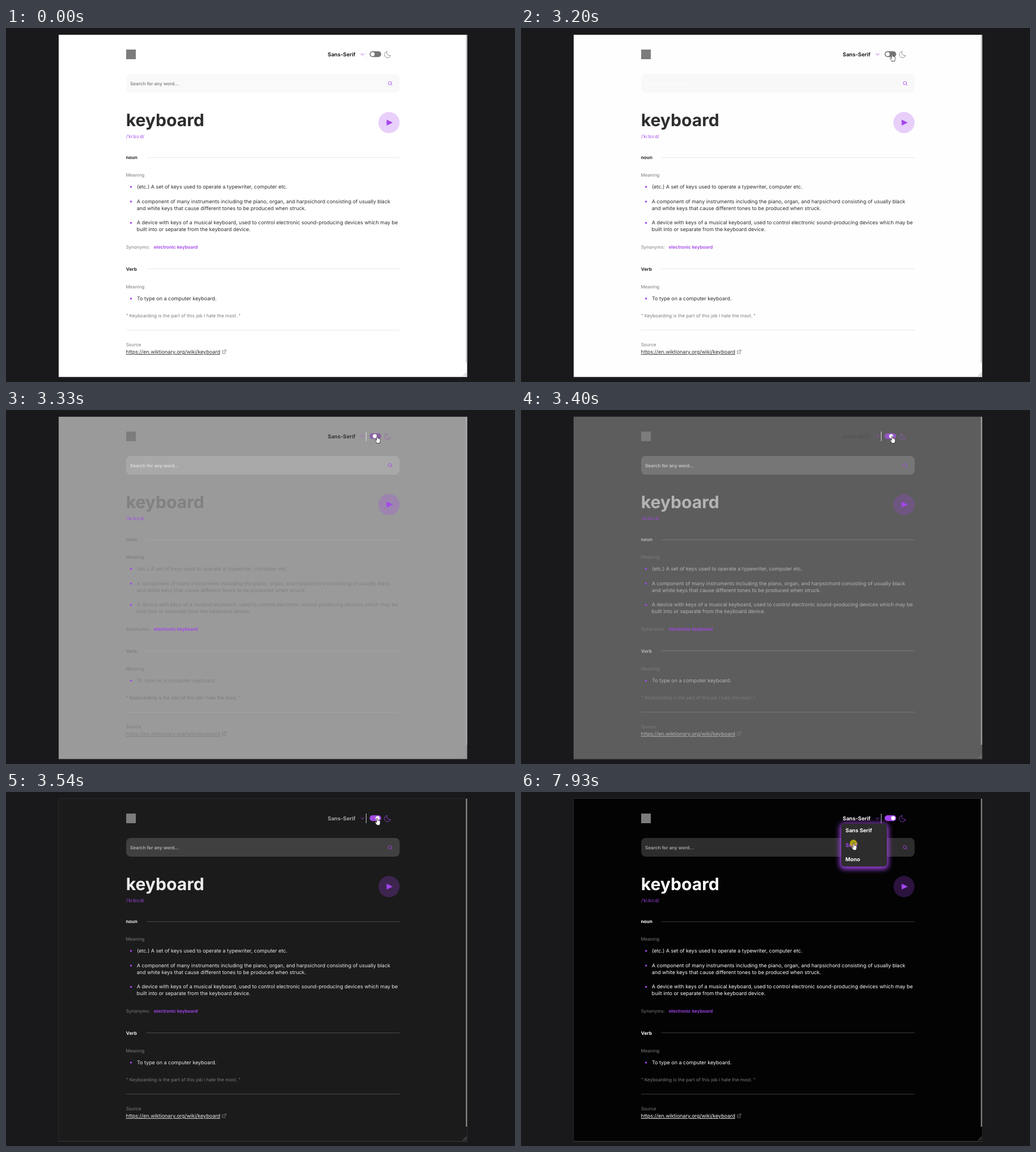
These frames come from a looping animation (898x624 px, 8 s). An HTML page:

```html
<!DOCTYPE html>
<html lang="en">
<head>
<meta charset="utf-8">
<title>Dictionary theme switch</title>
<style>
  html, body { margin: 0; width: 100%; height: 100%; overflow: hidden; background: #19191c; }
  svg { display: block; }
  text {
    font-family: Inter, "Open Sans", sans-serif;
    font-size: 8px;
    font-optical-sizing: none;
    text-rendering: geometricPrecision;
    white-space: pre;
  }
  .ink { fill: #2d2d2d; }
  .body { font-size: 8.98px; }
  .part { font-size: 8.2px; font-weight: 700; }
  .soft { fill: #7c7c7c; }
  .quote { font-size: 8.1px; }
  .semi { font-size: 8.07px; font-weight: 600; }
  .title { font-size: 30.1px; font-weight: 700; }
  .menu { font-size: 9.4px; font-weight: 700; }
  .opt { fill: #fff; }
  .accent { fill: #a445ed; }
  .link { text-decoration: underline; text-decoration-thickness: .8px; text-underline-offset: 1.6px; }
  .rule { stroke: #e9e9e9; }
  .icon { fill: none; stroke: #a445ed; stroke-width: .85; stroke-linecap: round; stroke-linejoin: round; }
  .grey { stroke: #7c7c7c; }
  .glow { fill: #a445ed; filter: blur(5px); }
</style>
</head>
<body>
<svg width="898" height="624" viewBox="0 0 898 624">
  <rect x="92.3" y="11.3" width="721.9" height="605.4" fill="#303032"/>
  <rect id="page" x="93" y="12" width="720.5" height="603" fill="#fff"/>
  <rect id="thumb" x="811.4" y="12" width="2" height="578" fill="#c6c6c6"/>
  <path d="M806.5 614L813 607.5M810 614L813 611" stroke="#8c8c8c" stroke-width=".9" fill="none"/>

  <!-- header -->
  <rect x="212" y="38" width="17" height="17" fill="#7c7c7c"/>
  <text id="font" class="ink menu" x="567.5" y="50">Sans-Serif</text>
  <path class="icon" d="M626.3 45.3L629 48L631.7 45.3"/>
  <path id="divider" d="M635.5 38V55" stroke="#efefef"/>
  <rect id="switch" x="641.5" y="41" width="20.5" height="10.2" rx="5.1" fill="#757575"/>
  <circle id="knob" cx="646.8" cy="46.1" r="3.6" fill="#fff"/>
  <path id="moon" class="icon grey" d="M671.8 41.4A5.6 5.6 0 1 0 678.5 48.5A5.6 5.6 0 0 1 671.8 41.4Z"/>

  <!-- search -->
  <rect id="search" x="212" y="81" width="482.5" height="33" rx="8" fill="#f9f9f9"/>
  <text id="hint" class="semi" x="219" y="100.6" fill="#858585">Search for any word...</text>
  <g class="icon"><circle cx="677.3" cy="97.2" r="2.9"/><path d="M679.5 99.4L681.3 101.2"/></g>

  <!-- entry -->
  <text class="ink title" x="211.7" y="173">keyboard</text>
  <text class="accent" x="212" y="194">/ˈkiːbɔːd/</text>
  <circle class="accent" cx="675.7" cy="166.7" r="18.7" opacity=".25"/>
  <path class="accent" d="M671.5 161.5L682.3 166.8L671.5 172.1Z"/>

  <text class="ink part" x="211.5" y="231">noun</text>
  <path class="rule" d="M248 228.5H694.5"/>
  <text class="soft" x="211.5" y="262">Meaning</text>
  <text class="ink body" x="231" y="282.7">(etc.) A set of keys used to operate a typewriter, computer etc.</text>
  <text class="ink body" x="230.7" y="308.7">A component of many instruments including the piano, organ, and harpsichord consisting of usually black</text>
  <text class="ink body" x="230.7" y="320.7">and white keys that cause different tones to be produced when struck.</text>
  <text class="ink body" x="230.7" y="346.1">A device with keys of a musical keyboard, used to control electronic sound-producing devices which may be</text>
  <text class="ink body" x="230.5" y="358.1">built into or separate from the keyboard device.</text>
  <text class="soft" x="211.7" y="389">Synonyms:</text>
  <text class="accent semi" x="260.8" y="389">electronic keyboard</text>

  <text class="ink part" x="211.8" y="428">Verb</text>
  <path class="rule" d="M247 424.5H694.5"/>
  <text class="soft" x="211.5" y="459">Meaning</text>
  <text class="ink body" x="230.9" y="479.8">To type on a computer keyboard.</text>
  <text class="soft quote" x="211.7" y="510">" Keyboarding is the part of this job I hate the most. "</text>
  <path class="rule" d="M212 532.5H694.5"/>
  <g class="accent">
    <circle cx="220.5" cy="280" r="1.7"/><circle cx="220.5" cy="306" r="1.7"/>
    <circle cx="220.5" cy="343.5" r="1.7"/><circle cx="220.5" cy="477" r="1.7"/>
  </g>

  <text class="soft" x="211.7" y="561">Source</text>
  <text class="ink body link" x="211.6" y="574">https://en.wiktionary.org/wiki/keyboard</text>
  <path class="icon grey" d="M384 568.8H381.7V574H386.7V571.6M385.3 567.6H388V570.3M388 567.6L384 571.6"/>

  <!-- font list -->
  <g id="list" opacity="0">
    <rect class="glow" x="562.5" y="55" width="85.5" height="81" rx="8"/>
    <rect x="565" y="55.5" width="80.5" height="76" rx="6" fill="#2d2d2d"/>
    <text id="sans" class="menu opt" x="572.5" y="71">Sans Serif</text>
    <text id="serif" class="menu opt" x="572.5" y="96.5">Serif</text>
    <text class="menu opt" x="572.3" y="122">Mono</text>
  </g>

  <!-- pointer, origin at its tip -->
  <g id="pointer" opacity="0">
    <circle id="click" cx="-.5" cy=".5" r="6.4" fill="#ffe600" fill-opacity=".62" opacity="0"/>
    <path id="arrow" d="M0 0V9.5L2.2 7.5L3.7 11L5.2 10.4L3.7 7H6.7Z" fill="#111" stroke="#fff" stroke-width=".7"/>
    <path id="hand" opacity="0" fill="#fff" stroke="#111" stroke-width=".7" stroke-linejoin="round"
      d="M-1.2 1Q-1.2 0-.2 0Q.8 0 .8 1V4Q2 3.6 2.6 4.4Q3.8 4.1 4.2 5Q5.3 4.9 5.2 6.3V8.5Q5.2 10 4.4 11V12.5H-1.2V11.3Q-3.2 9-4 7.2Q-3.6 6-2.4 6.8L-1.2 8Z"/>
  </g>
</svg>
<script>
const LOOP = 8000, DARK = 3197, FADE = 545, PURPLE = '#a445ed';

// rows: [time, value, easing towards the next row]
function track(sel, prop, rows, easing = 'linear') {
  const all = [[0, rows[0][1]], ...rows, [LOOP, rows.at(-1)[1]]];
  const frames = all.map(([t, v, ease]) => ({ offset: t / LOOP, [prop]: v, easing: ease || easing }));
  document.querySelectorAll(sel).forEach(el => el.animate(frames, { duration: LOOP, iterations: Infinity }));
}
const hold = (sel, prop, rows) => track(sel, prop, rows, 'steps(1, end)');
const theme = (sel, prop, from, to, ease = 'ease', span = FADE) =>
  track(sel, prop, [[DARK, from, ease], [DARK + span, to]]);

// light to dark
theme('#page', 'fill', '#fff', '#030303');
theme('#thumb', 'fill', '#c6c6c6', '#8f8f8f');
theme('#search', 'fill', '#f9f9f9', '#2d2d2d');
theme('.ink:not(#font)', 'fill', '#2d2d2d', '#fff');
theme('#font', 'fill', '#222', '#fff', 'ease-in-out', 620);
theme('.rule', 'stroke', '#e9e9e9', '#3a3a3a');
theme('#divider', 'stroke', '#efefef', '#c4c4c4');
theme('#switch', 'fill', '#757575', PURPLE);
theme('#moon', 'stroke', '#7c7c7c', PURPLE);
theme('#knob', 'transform', 'translateX(0px)', 'translateX(9.7px)');
hold('#hint', 'fill', [[0, '#858585'], [DARK, 'rgba(255,255,255,.6)']]);

// font list
track('#list', 'opacity', [[4370, 0], [4500, 1]]);
track('#sans', 'fill', [[4930, '#fff'], [5060, PURPLE], [7300, PURPLE], [7400, '#fff']]);
track('#serif', 'fill', [[7360, '#fff'], [7480, PURPLE]]);

// pointer
const path = [
  [170, 864, 600, 'cubic-bezier(.3,.2,.5,1)'], [930, 479, 192],
  [1000, 479, 192, 'ease-in-out'], [1740, 655, 46],
  [4100, 655, 46, 'ease-in-out'], [4580, 612, 45],
  [4720, 612, 45, 'ease-in-out'], [5000, 600, 78, 'ease-out'], [5200, 593, 70],
  [5460, 593, 70], [5650, 594, 68],
  [7110, 594, 68, 'ease-in-out'], [7660, 587, 90]
];
track('#pointer', 'transform', path.map(([t, x, y, ease]) => [t, `translate(${x}px, ${y}px)`, ease]));
hold('#pointer', 'opacity', [[0, 0], [170, 1]]);
hold('#arrow', 'opacity', [[0, 1], [1600, 0]]);
hold('#hand', 'opacity', [[0, 0], [1600, 1]]);
hold('#click', 'opacity', [[0, 0], [3060, 1], [DARK, 0], [6310, 1], [6440, 0], [7930, 1]]);
</script>
</body>
</html>
```
